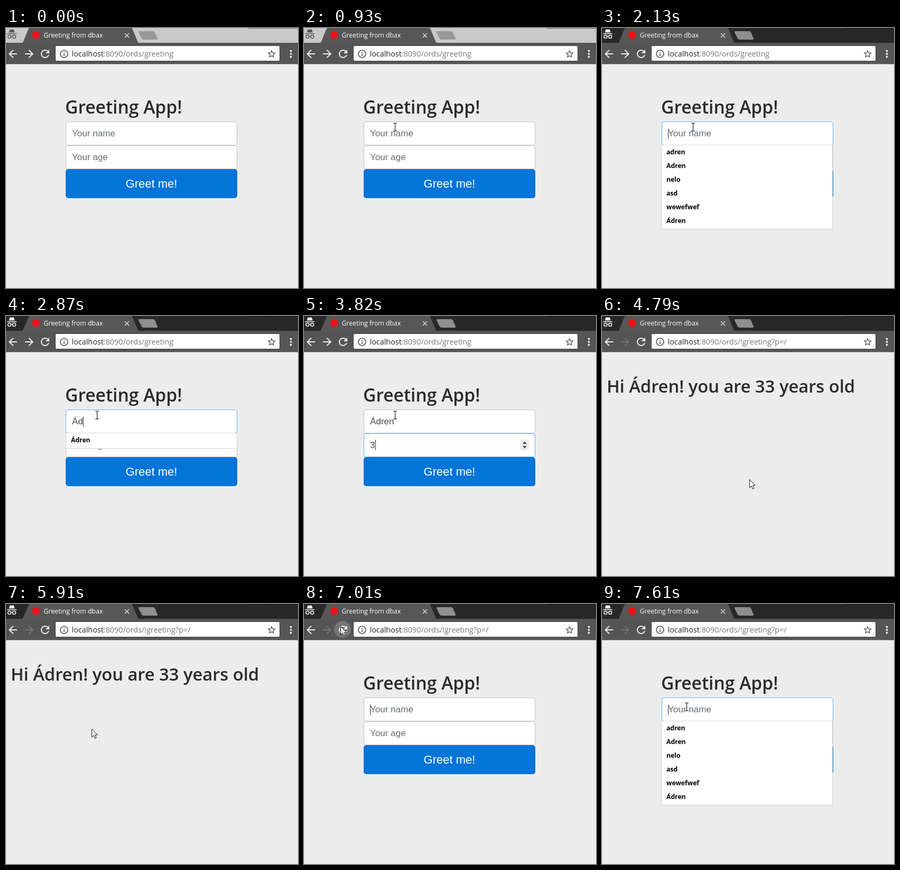
An HTML page for the animation above (8000 ms loop, 553 px wide and 492 px high).

```html
<!DOCTYPE html>
<html lang="en">
<head>
<meta charset="utf-8">
<title>Greeting App</title>
<style>
  html, body { margin: 0; width: 100%; height: 100%; overflow: hidden; background: #ececec; }
  svg { display: block; }
  text { white-space: pre; }
  .ui { font-family: "Open Sans", "Noto Sans", sans-serif; }
  .form { font: 17.1px "Liberation Sans", Arial, sans-serif; }
  .head { font-weight: 600; fill: #292b2c; }
  .item { font-size: 12.2px; font-weight: 700; }
  .icon { fill: #f1f1f1; }
</style>
</head>
<body>
<svg width="553" height="492" viewBox="0 0 553 492">
  <rect width="553" height="492" fill="#ececec"/>

  <g id="browser" class="ui">
    <rect id="strip" width="553" height="29"/>
    <path id="edge" stroke-width="1"/>
    <path d="M29 29Q32 28 33 25L42 3Q43 0 46 0H236Q239 0 240 3L249 25Q250 28 253 29Z" fill="#575757"/>
    <path id="newTab" d="M253 6H278Q281 6 282 8L287 20Q288 22 285 22H261Q258 22 257 20L251 8Q250 6 253 6Z"/>
    <g id="spy">
      <path d="M5.500 8.500L7 3.500Q7.500 2 9 2.500L11 3L13 2.500Q14.500 2 15 3.500L16.500 8.500ZM2 10H20V11.500H2Z"/>
      <g fill="none" stroke-width="1.500">
        <circle cx="6.500" cy="16.500" r="3"/><circle cx="15.500" cy="16.500" r="3"/>
        <path d="M9.500 16Q11 15 12.500 16"/>
      </g>
    </g>
    <circle id="favicon" cx="57" cy="13" r="7.500" fill="#ec1219"/>
    <path id="busy" d="M57 6.500A6.500 6.500 0 1 1 50.500 13" fill="none" stroke="#c4c4c4" stroke-width="2"/>
    <text x="71.500" y="18" font-size="12.300" fill="#fff">Greeting from dbax</text>
    <path d="M225 10L233 18M233 10L225 18" stroke="#cfcfcf" stroke-width="1.700"/>

    <rect y="28" width="553" height="40" fill="#555"/>
    <rect y="68" width="553" height="1" fill="#b4b4b4"/>
    <circle id="halo" cx="73" cy="48" r="16" fill="#747474"/>
    <path class="icon" transform="translate(1 37)" d="M20 11H7.830l5.590-5.590L12 4l-8 8 8 8 1.410-1.410L7.830 13H20z"/>
    <path class="icon" id="forward" transform="translate(32 37)" d="M12 4l-1.410 1.410L16.170 11H4v2h12.170l-5.580 5.590L12 20l8-8z"/>
    <path class="icon" id="reload" transform="translate(62 37)" d="M17.650 6.350A8 8 0 1 0 19.730 14h-2.080A6 6 0 1 1 12 6c1.660 0 3.140.690 4.220 1.780L13 11h7V4z"/>
    <path id="stop" transform="translate(62 37)" d="M6 6L18 18M18 6L6 18" stroke="#f1f1f1" stroke-width="2"/>
    <rect x="93.500" y="33.500" width="425" height="29" rx="2.500" fill="#fff" stroke="#454545"/>
    <circle cx="110" cy="49" r="7" fill="none" stroke="#5a5a5a" stroke-width="1.700"/>
    <path d="M110 45V46.800M110 48.200V53" stroke="#5a5a5a" stroke-width="1.800"/>
    <text x="124.500" y="54" font-size="14.400" fill="#222">localhost<tspan id="path" fill="#777"></tspan></text>
    <path transform="translate(493.400 39.400) scale(.8)" fill="#555" d="M22 9.240l-7.190-.620L12 2 9.190 8.630 2 9.240l5.460 4.730L5.820 21 12 17.270 18.180 21l-1.630-7.030zM12 15.400l-3.760 2.270 1-4.280-3.320-2.880 4.380-.380L12 6.100l1.710 4.040 4.380.380-3.320 2.880 1 4.280z"/>
    <g class="icon"><circle cx="539.500" cy="43.500" r="1.900"/><circle cx="539.500" cy="49" r="1.900"/><circle cx="539.500" cy="54.500" r="1.900"/></g>
  </g>

  <g id="form" class="form">
    <text class="ui head" x="112" y="162" font-size="33.600">Greeting App!</text>
    <rect id="nameBox" x="113.500" y="177.500" width="324" height="44" rx="3.500" fill="#fff"/>
    <rect id="ageBox" x="113.500" y="222.500" width="324" height="44" rx="3.500" fill="#fff"/>
    <text id="nameText" x="125" y="205"></text>
    <text id="ageText" x="125" y="250"></text>
    <g id="spinner">
      <rect x="410" y="234" width="16" height="20" fill="#ececec"/>
      <path d="M414 242L418 237.500L422 242ZM414 246L418 250.500L422 246Z" fill="#4a4a4a"/>
    </g>
    <rect id="button" x="113" y="267" width="325" height="55" rx="5"/>
    <text x="275.500" y="302" font-size="22" fill="#fff" text-anchor="middle">Greet me!</text>
    <g id="list" class="ui"></g>
    <rect id="caret" width="1" height="20" fill="#333"/>
  </g>

  <text id="reply" class="ui head" x="9" y="145" font-size="32.700">Hi Ádren! you are 33 years old</text>

  <path id="arrow" d="M.500.500V16L4 12.700L6.500 18.500L9 17.400L6.600 11.800H11.500Z" fill="#fff" stroke="#111" stroke-width="1"/>
  <path id="beam" d="M-3-7H-1Q.500-7 .500-5.500Q.500-7 2-7H4M.500-6V7M-3 8H-1Q.500 8 .500 6.500Q.500 8 2 8H4" fill="none" stroke="#111" stroke-width="1.100"/>
</svg>

<script>
const LOOP = 8000;
const GREY = '#c6c6c6', HALF = '#94bddd', BLUE = '#66b1ee';
const ALL = ['adren', 'Adren', 'nelo', 'asd', 'wewefwef', 'Ádren'];
const ONE = ['Ádren'];
const HOME = ':8090/ords/greeting', SENT = ':8090/ords/!greeting?p=/';

const start = {
  active: false, page: 'form', url: HOME, next: true, loading: false, tabBusy: false, halo: false,
  name: '', age: '', nameEdge: GREY, ageEdge: GREY, focus: '', caret: false, list: [],
  button: '#0275d8', pointer: '', at: [0, 0]
};
const arrow = (x, y) => ({ pointer: 'arrow', at: [x, y] });
const beam = (x, y) => ({ pointer: 'beam', at: [x, y] });

// Each step: time in ms, then what changes
const steps = [
  [340, arrow(9, 213)],
  [460, arrow(30, 206)],
  [580, arrow(70, 196)],
  [700, beam(124, 186)],
  [810, beam(160, 182)],
  [930, beam(172, 187)],
  [1170, { active: true, focus: 'name', caret: true, nameEdge: HALF }],
  [1290, { nameEdge: BLUE, list: ALL }],
  [1640, { caret: false }],
  [2130, { caret: true }],
  [2750, { name: 'Á', list: ONE }],
  [2870, { name: 'Ád' }],
  [2990, { name: 'Ádre' }],
  [3120, { name: 'Ádren' }],
  [3360, { list: [], focus: 'age', nameEdge: HALF, ageEdge: HALF }],
  [3480, { nameEdge: GREY, ageEdge: BLUE }],
  [3820, { age: '3' }],
  [4060, { age: '33' }],
  [4180, { ...arrow(252, 280), button: '#026cc9' }],
  [4300, { ...arrow(279, 309), button: '#0262b8' }],
  [4420, { button: '#025aa5' }],
  [4540, { loading: true, tabBusy: true }],
  [4670, { page: 'reply', url: SENT, next: false }],
  [4790, { loading: false, tabBusy: false }],
  [5910, arrow(162, 236)],
  [6030, arrow(139, 224)],
  [6400, arrow(108, 150)],
  [6520, arrow(78, 72)],
  [6640, { ...arrow(69, 42), halo: true }],
  [6760, { loading: true }],
  [6880, { page: 'form', name: '', age: '', focus: '', caret: false, ageEdge: GREY, button: '#0275d8' }],
  [7010, { loading: false, focus: 'name', caret: true }],
  [7120, { ...arrow(69, 44), halo: false, nameEdge: BLUE }],
  [7250, arrow(88, 84)],
  [7370, arrow(126, 150)],
  [7490, beam(156, 190)],
  [7610, { ...beam(160, 194), list: ALL }]
];

const $ = id => document.getElementById(id);
const set = (id, attrs) => { for (const k in attrs) $(id).setAttribute(k, attrs[k]); };
const show = (id, on) => { $(id).style.display = on ? '' : 'none'; };

function field(id, value, hint) {
  $(id).textContent = value || hint;
  set(id, { fill: value ? '#464a4c' : '#636c72' });
}

function listMarkup(items) {
  if (!items.length) return '';
  const full = items.length > 1, x = full ? 112.5 : 113.5, h = full ? 159 : 29;
  const rows = items.map((s, i) =>
    `<text class="item" x="${x + 9.5}" y="${239 + 26 * i}">${s}</text>`).join('');
  return `<rect x="${x}" y="221.5" width="324" height="${h}" fill="#fff" stroke="#d2d5d8"/>${rows}`;
}

function draw(s) {
  set('strip', { fill: s.active ? '#282828' : '#c9c9c9' });
  set('edge', s.active
    ? { d: 'M461 .5H485M487 .5H511M513 .5H553', stroke: '#0c0c0c' }
    : { d: 'M459 .5H553', stroke: '#505050' });
  set('newTab', { fill: s.active ? '#8f8f8f' : '#999' });
  const badge = s.active ? '#f4f4f4' : '#5a5a5a';
  set('spy', { fill: badge, stroke: badge, 'stroke-width': 0 });
  set('forward', { opacity: s.next ? 1 : 0.2 });
  $('path').textContent = s.url;
  show('favicon', !s.tabBusy);
  show('busy', s.tabBusy);
  show('reload', !s.loading);
  show('stop', s.loading);
  show('halo', s.halo);

  show('form', s.page === 'form');
  show('reply', s.page === 'reply');
  field('nameText', s.name, 'Your name');
  field('ageText', s.age, 'Your age');
  set('nameBox', { stroke: s.nameEdge });
  set('ageBox', { stroke: s.ageEdge });
  set('button', { fill: s.button });
  show('spinner', s.focus === 'age');
  $('list').innerHTML = listMarkup(s.list);

  show('caret', s.focus && s.caret);
  if (s.focus && s.page === 'form') {
    const width = s[s.focus] ? $(s.focus + 'Text').getComputedTextLength() : 0;
    set('caret', { x: Math.round(125 + width), y: s.focus === 'name' ? 190 : 234 });
  }
  for (const id of ['arrow', 'beam']) {
    show(id, s.pointer === id);
    set(id, { transform: `translate(${s.at})` });
  }
}

const origin = performance.now();
let shown = -1;
function tick() {
  const t = (performance.now() - origin) % LOOP;
  const past = steps.filter(step => step[0] <= t);
  if (past.length !== shown) {
    shown = past.length;
    draw(Object.assign({}, start, ...past.map(step => step[1])));
  }
  requestAnimationFrame(tick);
}
tick();
</script>
</body>
</html>
```
